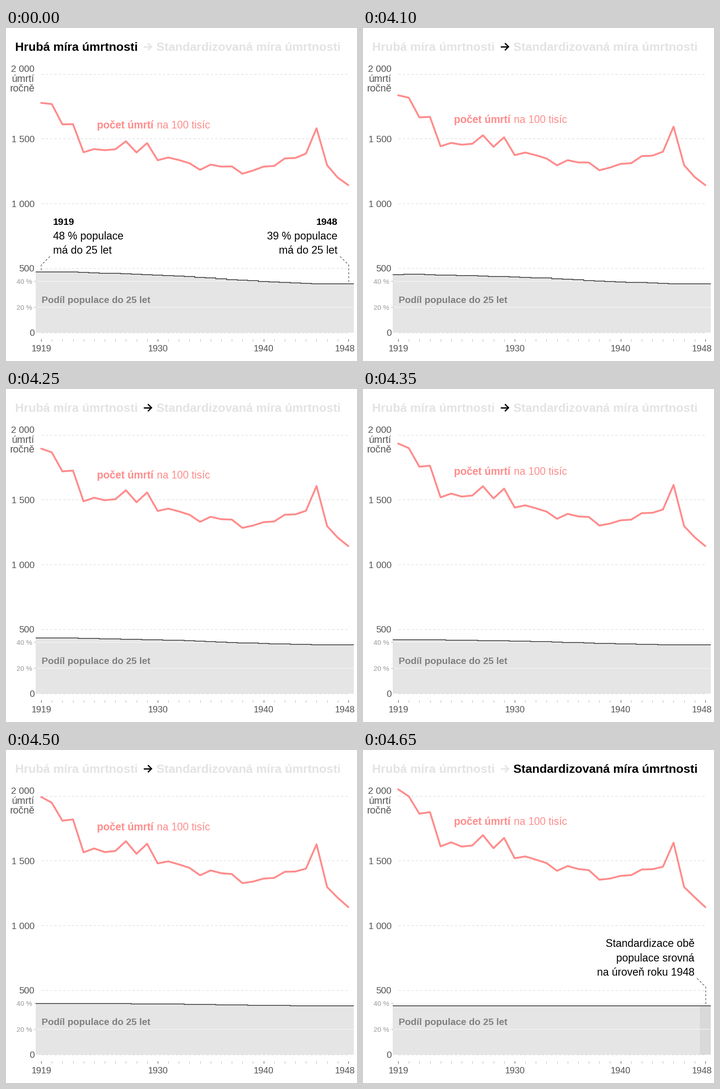
These frames come from a looping animation (768x729 px, 8650 ms). A matplotlib script:

```python
import numpy as np
import matplotlib.pyplot as plt
from matplotlib.animation import FuncAnimation

WIDTH, HEIGHT, DPI = 768, 729, 96
PX = 72 / DPI  # points per pixel
INTERVAL, HOLD, STEPS = 50, 80, 14
FRAMES = 2 * HOLD + STEPS - 1

BLACK, PALE, AXIS, MUTED = "#000000", "#e3e3e3", "#555555", "#999999"
GRID, AREA, BAND, EDGE, PINK = "#dcdcdc", "#e5e5e5", "#d9d9d9", "#555555", "#ff8c8c"
LEFT, RIGHT, ZERO, TARGET = 77, 749, 667, 560.2

plt.rcParams["font.family"] = "Liberation Sans"
fig = plt.figure(figsize=(WIDTH / DPI, HEIGHT / DPI), dpi=DPI, facecolor="white")
ax = fig.add_axes([0, 0, 1, 1])
ax.set(xlim=(0, WIDTH), ylim=(HEIGHT, 0))
ax.set_autoscale_on(False)
ax.axis("off")

years = np.arange(1919, 1949)


def year_x(year):
    return LEFT + (year - 1919) * (RIGHT - LEFT) / 29


def text(x, y, label, size, color=AXIS, ha="left", weight="normal"):
    return ax.text(x, y, label, fontsize=size * PX, color=color, ha=ha,
                   va="baseline", weight=weight, zorder=6)


def line(xs, ys, color, width, dash=None, zorder=2, cap="butt"):
    style = (0, [d / width for d in dash]) if dash else "-"
    return ax.plot(xs, ys, color=color, lw=width * PX, ls=style, zorder=zorder,
                   dash_capstyle="butt", solid_capstyle=cap,
                   solid_joinstyle="miter")[0]


# Death rate heights in pixels: crude and standardised
crude = np.array([
    164, 166.5, 211, 210.5, 272, 265, 267.5, 265.5, 248, 272.5,
    252, 289.5, 283.5, 289, 296, 310.5, 299, 303.5, 303, 319,
    312, 303.5, 302, 285.5, 284.5, 275, 219.5, 300.5, 327.5, 344])
standard = np.array([
    86, 101.5, 139.5, 136, 211, 202, 211.5, 209, 186.5, 215,
    192.5, 237, 233, 240, 247.5, 264.5, 254, 260.5, 263, 284,
    281.5, 275.5, 274, 261.5, 261, 255.5, 203, 300, 322.5, 344])

# Top of the share of people under 25
young = np.interp(years, [1919, 1921, 1930, 1933, 1935, 1937, 1940, 1945, 1948],
                  [534, 533.6, 540.5, 544, 547, 551, 554.5, 559.7, 560.4])
edges = year_x(np.arange(1919, 1950) - 0.5)

# Title
crude_title = text(20.5, 50, "Hrubá míra úmrtnosti", 26.4, weight="bold")
standard_title = text(329, 50, "Standardizovaná míra úmrtnosti", 26.4, weight="bold")
arrow = [line([300.5, 318], [41, 41], PALE, 2.8),
         line([310.5, 318.3, 310.5], [33.2, 41, 48.8], PALE, 2.8)]

# Axes
for y in (100.5, 242.3, 384.2, 525.7, ZERO):
    line([LEFT, RIGHT], [y, y], GRID, 1.2, (5, 4.5))
for y, label in ((250, "1 500"), (392, "1 000"), (533, "500"), (674.5, "0")):
    text(62.5, y, label, 20.4, ha="right")
text(62.5, 96, "2 000", 20.6, ha="right")
text(62.5, 117.5, "úmrtí", 21.8, ha="right")
text(62.5, 139, "ročně", 21.8, ha="right")

for year in years:
    major = year in (1919, 1930, 1940, 1948)
    x = year_x(year)
    line([x, x], [680.5, 686], AXIS if major else "#bbbbbb", 1.2)
for x, label in ((77, "1919"), (332, "1930"), (563, "1940"), (741, "1948")):
    text(x, 707.5, label, 19.6, ha="center")

# Population area
area = ax.stairs(young, edges, baseline=ZERO, fill=True, color=AREA, lw=0, zorder=1)
band = ax.fill_between(edges[-2:], TARGET, ZERO, color=BAND, lw=0, zorder=1.5)
outline = ax.stairs(young, edges, baseline=None, color=EDGE, lw=2 * PX, zorder=4)
for y, label in ((553.8, "40 %"), (610.5, "20 %")):
    line([edges[0], edges[-1]], [y, y], "#f7f7f7", 1.3)
    line([60.5, 65.5], [y, y], "#bbbbbb", 1.2)
    text(57, y + 6.5, label, 15, MUTED, "right")
text(78, 601.5, "Podíl populace do 25 let", 20.8, "#808080", weight="bold")

# Death rate curve and its label
curve = line(year_x(years), crude, PINK, 4, zorder=5, cap="round")
curve.set_solid_joinstyle("round")
curve_labels = [text(199, 219.5, "počet úmrtí", 22.8, PINK, weight="bold"),
                text(330.5, 219.5, "na 100 tisíc", 22.8, PINK)]


def callout(x, ha, rows, bold_first):
    return [text(x, 431 + 31.5 * i, row, 21 if bold_first and i == 0 else 23.3, BLACK,
                 ha, "bold" if bold_first and i == 0 else "normal")
            for i, row in enumerate(rows)]


def leader(xs, ys):
    return line(xs, ys, "#444444", 1.2, (4.5, 4), 5)


right_leader = leader([731, 750, 750], [500, 519, 559])
before = [*callout(103, "left", ["1919", "48 % populace", "má do 25 let"], True),
          *callout(725.5, "right", ["1948", "39 % populace", "má do 25 let"], True),
          leader([96, 77, 77], [500, 519, 533])]
after = [*callout(725.5, "right",
                  ["Standardizace obě", "populace srovná", "na úroveň roku 1948"], False),
         band]


def update(frame):
    step = min(max(frame - HOLD + 1, 0), STEPS)
    progress = step / STEPS
    first, last = step == 0, step == STEPS

    curve.set_ydata(crude + (standard - crude) * progress)
    for label in curve_labels:
        label.set_y(219.5 - 56 * progress)
    top = young + (TARGET - young) * progress
    area.set_data(values=top)
    outline.set_data(values=top)

    crude_title.set_color(BLACK if first else PALE)
    standard_title.set_color(BLACK if last else PALE)
    for part in arrow:
        part.set_color(PALE if first or last else BLACK)
    for artist in before:
        artist.set_visible(first)
    for artist in after:
        artist.set_visible(last)
    right_leader.set_visible(first or last)
    return []


animation = FuncAnimation(fig, update, frames=FRAMES, interval=INTERVAL,
                          init_func=lambda: update(0), repeat=True, repeat_delay=0)
plt.show()
```
